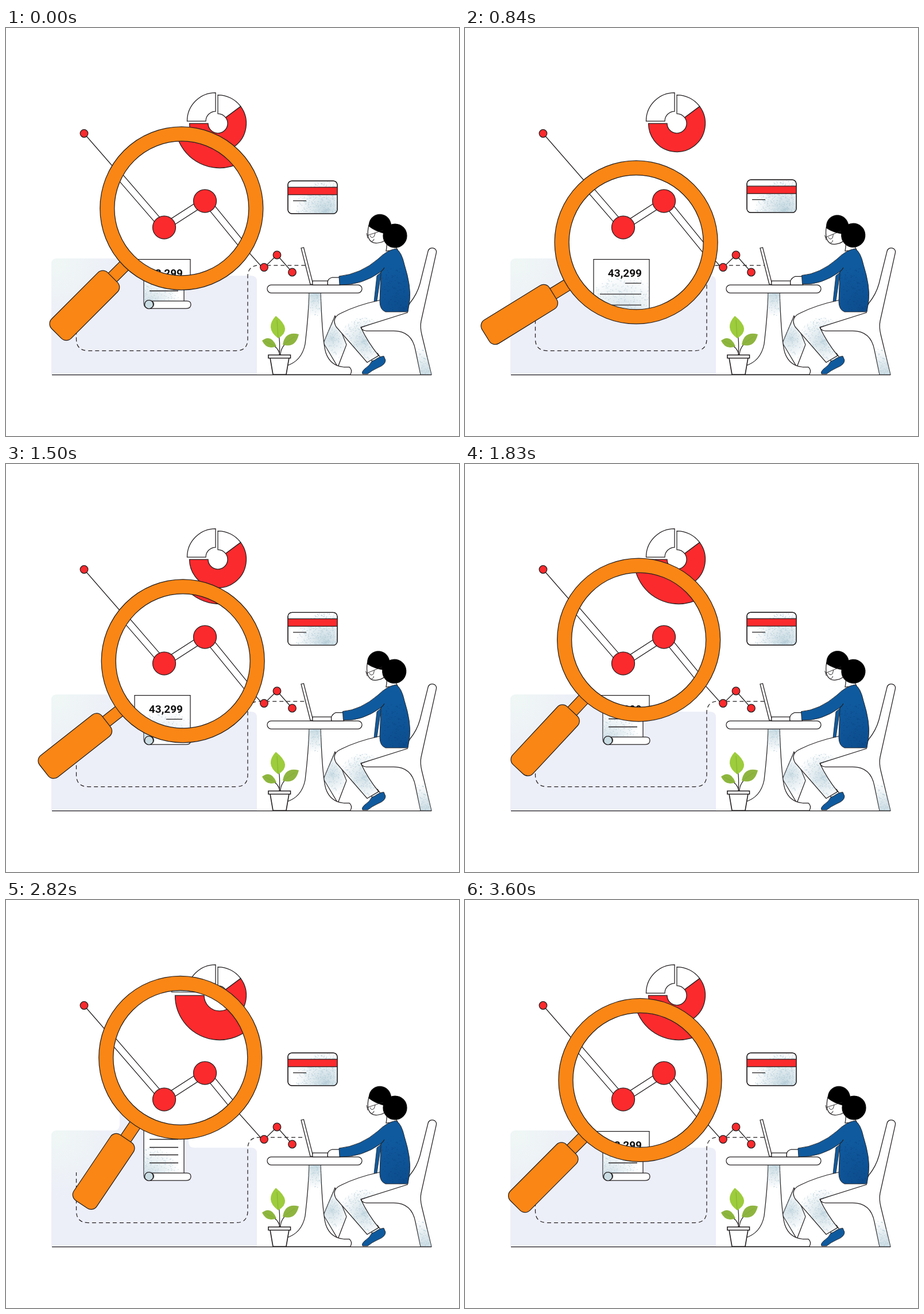
These frames come from a looping animation (789 by 710 pixels, 3.63 s). An HTML page with a canvas:

```html
<!DOCTYPE html>
<html lang="en">
<head>
<meta charset="utf-8">
<title>Data research</title>
<style>
html, body { margin: 0; width: 100%; height: 100%; overflow: hidden; background: #fff; }
canvas { display: block; }
</style>
</head>
<body>
<canvas id="stage" width="789" height="710"></canvas>
<script>
const ctx = document.getElementById('stage').getContext('2d');
const LOOP = 3630, STEP = 30, TAU = Math.PI * 2;
const INK = '#231f20', RED = '#fb2a2d', ORANGE = '#fa8615', MIST = '#b3ccd7', BLUE = '#0f5a9e', NAVY = '#0b4381';

// Periodic monotone cubic through [time, value] keys.
function track(keys) {
  const n = keys.length;
  const key = i => {
    const [t, v] = keys[(i + n) % n];
    return [t + Math.floor(i / n) * LOOP, v];
  };
  const slope = i => (key(i + 1)[1] - key(i)[1]) / (key(i + 1)[0] - key(i)[0]);
  const tangent = i => {
    const a = slope(i - 1), b = slope(i);
    return a * b <= 0 ? 0 : 2 * a * b / (a + b);
  };
  return t => {
    let i = n - 1;
    while (i > 0 && keys[i][0] > t) i--;
    const [t0, a] = key(i), [t1, b] = key(i + 1), h = t1 - t0, u = (t - t0) / h;
    const m0 = tangent(i) * h, m1 = tangent(i + 1) * h;
    return a + u * (m0 + u * (3 * (b - a) - 2 * m0 - m1 + u * (2 * (a - b) + m0 + m1)));
  };
}

const pivotX = track([[0, 76], [540, 57], [930, 17], [1140, 28], [1620, 62], [1830, 81], [2250, 115], [2520, 126], [2820, 122], [3600, 75.6]]);
const tilt = track([[0, 45], [540, 45], [980, 27.5], [1140, 29.9], [1830, 47], [2250, 58.9], [2430, 60.5], [2820, 56], [3600, 45.1]]);
const cardLift = track([[0, 0], [540, 0], [1140, -4.6], [1700, -8.4], [1830, -8], [2250, -4.3], [2820, 0]]);
const lean = track([[0, 0], [540, 0.88], [1140, 1.05], [1830, 0.85], [2250, 0], [2820, 0]]);

function paint(path, fill, stroke = INK, width = 1.25) {
  if (fill) { ctx.fillStyle = fill; ctx.fill(path); }
  if (stroke) { ctx.strokeStyle = stroke; ctx.lineWidth = width; ctx.stroke(path); }
}
const shape = (d, fill, stroke, width) => paint(new Path2D(d), fill, stroke, width);
const lines = (d, width) => shape(d, null, INK, width);

function disc(x, y, r, fill, stroke) {
  const p = new Path2D();
  p.arc(x, y, r, 0, TAU);
  paint(p, fill, stroke);
}

function roundBox(x, y, w, h, r, fill, stroke) {
  const p = new Path2D();
  p.roundRect(x, y, w, h, r);
  paint(p, fill, stroke);
  return p;
}

// Sprayed shading inside a path, densest at (x, y) and gone at distance r.
function spray(path, x, y, r, color, count, alpha = 0.5) {
  ctx.save();
  ctx.clip(path);
  const g = ctx.createRadialGradient(x, y, 0, x, y, r);
  g.addColorStop(0, color);
  g.addColorStop(1, color + '00');
  ctx.globalAlpha = alpha;
  ctx.fillStyle = g;
  ctx.fillRect(x - r, y - r, r * 2, r * 2);
  ctx.fillStyle = color;
  let seed = 7;
  const rnd = () => (seed = seed * 16807 % 2147483647) / 2147483647;
  for (let i = 0; i < count; i++) {
    const a = rnd() * TAU, d = r * Math.pow(rnd(), 0.7);
    ctx.fillRect(x + d * Math.cos(a), y + d * Math.sin(a), 1.3, 1.3);
  }
  ctx.restore();
}

function slice(x, y, outer, inner, from, to, fill) {
  const p = new Path2D();
  p.arc(x, y, outer, from, to);
  p.arc(x, y, inner, to, from, true);
  p.closePath();
  paint(p, fill);
  return p;
}

function pie(x, y, outer, inner, gap) {
  const cut = -0.64;
  slice(x, y, outer, inner, -Math.PI / 2, cut, '#fff');
  slice(x, y, outer, inner, cut, Math.PI, RED);
  return slice(x - gap, y - gap, outer, inner, Math.PI, Math.PI * 1.5, '#fff');
}

function drawBackdrop(t) {
  const floor = new Path2D('M79 603V411Q79 401 89 401H188Q198 401 198 391V340H318V421Q318 431 328 431H427Q437 431 437 441V603Z');
  paint(floor, '#eceef8', null);
  spray(floor, 90, 410, 110, '#f0f8f5', 500, 0.9);

  ctx.save();
  ctx.setLineDash([7, 5]);
  ctx.lineDashOffset = -(4.3 + t / LOOP * 24);
  lines('M122.5 474V541Q122.5 561.5 143 561.5H401Q421 561.5 421 541V433Q421 413 441 413H521');
  ctx.restore();

  const sheet = new Path2D('M240 380H310V476H256Q263 488 250 488Q240 488 240 478Z');
  paint(sheet, '#fff');
  spray(sheet, 250, 482, 52, MIST, 420, 0.65);
  lines('M250 416.5H300M250 430.5H300M250 443.5H300M250 457.5H300', 1.5);
  shape('M250 488Q259 486 257 478Q254 474 248 475H315Q322 475 322 481Q322 488 314 488Z', '#fff');
  disc(249, 481, 7.5, '#c9dce3');

  pie(369, 166, 49.5, 17, 4);
  lines('M136 183.5L275 343M346 304.5L443.5 413.5L449.5 417L472 395L498.5 425');
  for (const [x, y] of [[136, 183.5], [449.5, 416.5], [472, 395], [498.5, 425]]) disc(x, y, 6.8, RED);
}

function drawCard(dy) {
  ctx.save();
  ctx.translate(0, dy);
  const card = roundBox(491, 266, 86, 57, 7, '#fff');
  spray(card, 556, 318, 52, MIST, 900, 0.75);
  ctx.fillStyle = RED;
  ctx.fillRect(491, 277, 86, 13);
  lines('M491 277H577M491 290H577M500 300.5H523');
  paint(card, null);
  ctx.restore();
}

function drawChair() {
  const chair = new Path2D('M735 389C736 380 751 381 749.5 391L723 510Q721 520 724 533L741 603H722L713 560Q707 527 675 527H627Q619 526 619 521L690 495Q699 488 704 478Q716 463 721 445Z');
  paint(chair, '#fff');
  spray(chair, 732, 606, 50, MIST, 330, 0.75);
}

function drawTable() {
  const farLeg = new Path2D('M573 501L553 548L578 590L593 551Z');
  paint(farLeg, '#fff');
  spray(farLeg, 566, 540, 36, MIST, 250, 0.6);
  const leg = new Path2D('M528 460Q527 500 521 550Q515 580 488 588V603H600Q604 595 598 590H588Q565 588 557 565Q551 545 548 460Z');
  paint(leg, '#fff');
  spray(leg, 538, 460, 42, MIST, 330, 0.75);
  roundBox(455, 447, 165, 14, 7, '#fff');
  shape('M514 383L518.5 382L535 446H530Z', '#fff');
  shape('M534 440H582V447H534Z', '#fff');
}

function drawPlant() {
  lines('M476 569Q478 550 474 520M477 569Q475 556 460 549M478 569Q478 554 496 541');
  const leaves = [
    ['M470 501Q450 522 474 540Q500 525 470 501Z', '#9dcc3c'],
    ['M446 544Q462 532 471 554Q454 561 446 544Z', '#8db63e'],
    ['M510 533Q504 558 482 551Q486 527 510 533Z', '#8fb540']
  ];
  for (const [d, color] of leaves) shape(d, color, null);
  shape('M472 508L474 539M451 545L470 554M503 537L484 550', null, '#7fa936', 0.8);
  shape('M460 574H493L488 603H465Z', '#fff', INK, 1.6);
  shape('M457 569H495.5V574.5H457Z', '#fff', INK, 1.6);
}

function drawHead(s) {
  ctx.save();
  ctx.translate(668, 376);
  ctx.rotate(-0.085 * s);
  ctx.translate(-668, -376);
  shape('M632 343Q629 355 631 364Q635 376 648 374Q659 373 664 365L670 345Z', '#fff');
  shape('M632 345C632 316 674 317 671 350Q663 352 661 358Q643 354 632 345Z', '#000', '#000', 0.6);
  disc(677.5, 361.5, 20.5, '#000', '#000');
  lines('M628 357L630 366M629 361L657 352M634 361Q636 367 641 363L643 357M637 371Q641 371 641 367', 0.9);
  ctx.restore();
}

function drawWoman(s) {
  const dx = 6.5 * s, dy = -1.5 * s;
  shape('M634 574L641 585L652 573L647 566Z', '#e3edf1');
  shape('M642 578Q652 571 658 571L661 578Q661 586 648 591Q637 596 630 602H621Q619 598 625 593Q634 587 637 580Z', BLUE, INK, 0.9);
  const legLine = 'M652 473.5Q612 482 584 496Q566 504 575 520L629 582L649 570Q631 548 618 521L700 495';
  const trousers = new Path2D(legLine);
  paint(trousers, '#fff', null);
  spray(trousers, 622, 545, 42, MIST, 420, 0.6);
  lines(legLine);

  shape('M663 370Q664 378 662 388L682 386L674 372Z', '#fff');
  shape('M657 422L646 431L641 476L646 475L652 434Z', BLUE, INK, 0.8);
  shape(`M${582 + dx} ${434 + dy}L${568 + dx} ${434 + dy}Q${558 + dx} 437 ${560.5 + dx} 447H${582 + dx}Z`, '#fff');
  const x = 580 + dx, y = 432 + dy;
  const sweater = new Path2D(`M679 384Q689 389 694 412Q706 450 703 475L700 494H661Q651 490 651 476L653 424Q620 448 ${x + 1} ${y + 15}L${x} ${y}Q618 428 648 402Q663 387 679 384Z`);
  paint(sweater, BLUE, null);
  spray(sweater, 690, 490, 75, NAVY, 500, 0.55);
  paint(sweater, null, INK, 0.9);
  lines('M653 424Q657 421 659 417');
  drawHead(s);
}

function bar(x0, y0, x1, y1) {
  ctx.save();
  ctx.translate(x0, y0);
  ctx.rotate(Math.atan2(y1 - y0, x1 - x0));
  roundBox(0, -6, Math.hypot(x1 - x0, y1 - y0), 12, 0, '#fff');
  ctx.restore();
}

function drawEnlarged() {
  const sheet = new Path2D('M224 402.5H321V540H224Z');
  paint(sheet, '#fff');
  spray(sheet, 275, 505, 75, MIST, 700, 0.65);
  lines('M279 444H307M235 463H307M250 482H307');
  ctx.fillStyle = '#111';
  ctx.font = '700 19px Roboto, sans-serif';
  ctx.textAlign = 'right';
  ctx.fillText('43,299', 308, 433);

  const quarter = pie(372, 166, 77.5, 27, 6);
  spray(quarter, 305, 160, 38, MIST, 250, 0.6);

  bar(175.5, 232, 275, 347);
  bar(275, 347, 346.5, 301);
  bar(346.5, 298, 433, 404);
  for (const [x, y] of [[275.5, 347], [346.5, 301], [433, 404]]) disc(x, y, 20, RED);
}

function drawMagnifier(t) {
  const angle = tilt(t) * Math.PI / 180, reach = 325;
  const cx = pivotX(t) + reach * Math.cos(angle), cy = 543.7 - reach * Math.sin(angle);

  ctx.save();
  ctx.translate(cx, cy);
  ctx.rotate(Math.PI - angle);
  roundBox(138, -10.5, 40, 21, 0, ORANGE);
  roundBox(170, -24, 138, 48, 12, ORANGE);
  ctx.restore();

  disc(cx, cy, 142, ORANGE);
  ctx.save();
  const glass = new Path2D();
  glass.arc(cx, cy, 117, 0, TAU);
  paint(glass, '#fff', null);
  ctx.clip(glass);
  drawEnlarged();
  ctx.restore();
  paint(glass, null);
}

function render(t) {
  ctx.fillStyle = '#fff';
  ctx.fillRect(0, 0, 789, 710);
  drawBackdrop(t);
  drawCard(cardLift(t));
  drawChair();
  drawTable();
  drawPlant();
  drawWoman(lean(t));
  lines('M80 603.5H741');
  drawMagnifier(t);
}

const start = performance.now();
function tick() {
  const elapsed = (performance.now() - start) % LOOP;
  render(Math.floor(elapsed / STEP) * STEP);
  requestAnimationFrame(tick);
}
tick();
</script>
</body>
</html>
```
